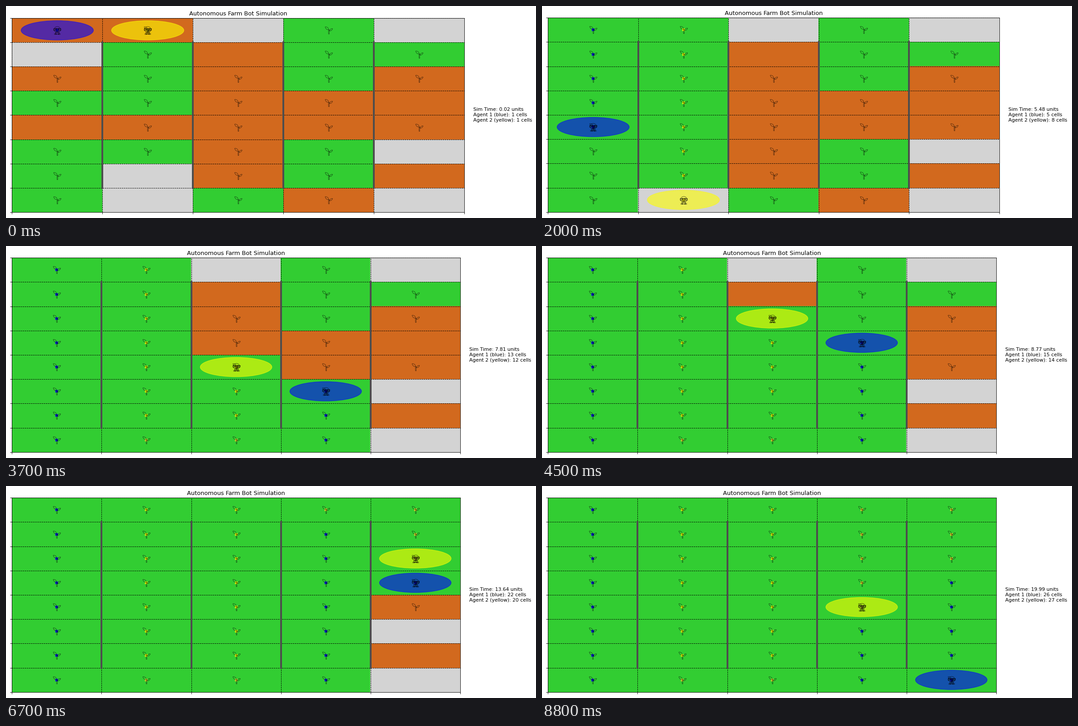
Animation of 1183 by 473 pixels, one loop 8900 ms. Source, as a matplotlib script:

```python
import numpy as np
import matplotlib.pyplot as plt
from matplotlib.animation import FuncAnimation
from matplotlib.colors import ListedColormap
from matplotlib.patches import Circle
from matplotlib.path import Path

W, H, DPI = 1183, 473, 80
FRAMES = 89
COLS, ROWS = 5, 8
FALLOW, TILLED, PLANTED, GROWN = range(4)
NEXT = {FALLOW: GROWN, TILLED: PLANTED, PLANTED: GROWN}
COLORS = {"A": "blue", "B": "yellow"}

# one letter per cell: fallow, tilled, planted, grown
FIELD = ["TPFGF", "FGTGG", "PGPGP", "GGPPT",
         "TPPPP", "GGPGF", "GFPGT", "GFGPF"]


def lane(col, start, stop):
    step = 1 if stop >= start else -1
    return [(col, row) for row in range(start, stop + step, step)]


ROUTES = {
    "A": lane(0, 0, 7) + [(1, 7), (2, 7)] + lane(3, 7, 0) + lane(4, 0, 7),
    "B": lane(1, 0, 7) + lane(2, 7, 0) + [(3, 0)] + lane(4, 0, 2)
         + lane(4, 1, 0) + lane(3, 0, 4),
}


def simulate():
    """Agents take turns: tend the cell underneath, else move on."""
    field = np.array([["FTPG".index(c) for c in row] for row in FIELD])
    pos = {"A": 0, "B": 0}
    tick = 0
    history = [(field.copy(), dict(pos), tick)]
    for n in range(1, FRAMES):
        me, other = ("A", "B") if n % 2 else ("B", "A")
        route, i = ROUTES[me], pos[me]
        (col, row), (c0, r0) = route[i], route[max(i - 1, 0)]
        ahead = (2 * col - c0, 2 * row - r0)
        held = i > 0 and ROUTES[other][pos[other]] == ahead
        if field[row, col] != GROWN:
            field[row, col] = NEXT[field[row, col]]
        elif not held and i + 1 < len(route):
            pos[me] += 1
        if not held:
            tick = n
        history.append((field.copy(), dict(pos), tick))
    return history


HISTORY = simulate()


def clock(tick):
    return np.interp(tick, [0, 20, 29, 45, 57, 77, 88],
                     [0.02, 5.48, 6.85, 8.77, 12.16, 15.13, 19.99])


# glyph parts in pixels around the cell centre, y up
def ring(x, y, rx, ry):
    unit = Path.unit_circle()
    return Path(unit.vertices * (rx, ry) + (x, y), unit.codes)


def box(x, y, rx, ry):
    corners = [(-1, -1), (1, -1), (1, 1), (-1, 1), (-1, -1)]
    return Path(np.array(corners) * (rx, ry) + (x, y))


def leaf(base, tip, bulge):
    base, tip = np.array(base), np.array(tip)
    mid = (base + tip) / 2
    side = bulge * np.array([base[1] - tip[1], tip[0] - base[0]])
    return Path([base, mid + side, tip, mid - side, base],
                [Path.MOVETO] + [Path.CURVE3] * 4)


SPROUT = Path.make_compound_path(
    leaf((0, 1.5), (-8, 8), 0.45), leaf((1.5, -1), (8.5, 4), 0.4),
    box(0.3, -3.5, 0.9, 4.5))
ROBOT = Path.make_compound_path(
    ring(0, 2, 7, 6.5), box(0, 2, 8.3, 2),
    *[ring(s * 2.8, 2.5, r, r) for s in (-1, 1) for r in (0.7, 2)],
    box(0, -2, 2.5, 0.6), box(0, -6, 4, 2.2),
    *[box(s * 4, -8, 2.5, 0.8) for s in (-1, 1)])

plt.rcParams["font.family"] = "DejaVu Sans"
fig = plt.figure(figsize=(W / DPI, H / DPI), dpi=DPI, facecolor="white")
ax = fig.add_axes([0, 0, 1, 1])
ax.set_title("Autonomous Farm Bot Simulation", fontsize=11.7)

cells = ax.imshow(HISTORY[0][0], extent=(0, COLS, ROWS, 0), aspect="auto",
                  interpolation="nearest", vmin=0, vmax=3,
                  cmap=ListedColormap(["lightgray", "chocolate",
                                       "chocolate", "limegreen"]))
ax.set_xticks(range(COLS + 1))
ax.set_yticks(range(ROWS + 1))
ax.tick_params(labelbottom=False, labelleft=False)
ax.grid(color="black", linestyle="--", linewidth=0.8)
for x in range(1, COLS):
    ax.plot([x, x], [1, ROWS - 1], color="#4d4d4d", linewidth=3.6)
ax.set_xlim(0, COLS)
ax.set_ylim(ROWS, 0)


def glyphs(path, weight):
    size = 2 * np.abs(path.vertices).max() * 72 / DPI
    return ax.plot([], [], ls="", marker=path, ms=size, mfc="none",
                   mec="black", mew=weight, zorder=3)[0]


def trail(color):
    return ax.plot([], [], ls="", marker="s", ms=5, mew=0, color=color,
                   alpha=0.8, zorder=2.2)[0]


def body(color):
    return ax.add_patch(Circle((0, 0), 0.4, color=color, alpha=0.6))


trails = {k: trail(c) for k, c in COLORS.items()}
bodies = {k: body(c) for k, c in COLORS.items()}
sprouts, robots = glyphs(SPROUT, 0.45), glyphs(ROBOT, 0.5)
info = ax.text(1.02, 0.5, "", transform=ax.transAxes, fontsize=9.8,
               va="center", linespacing=1.25)


def place(right, top, left=13.45, bottom=459.7):
    ax.set_position([left / W, 1 - bottom / H,
                     (right - left) / W, (bottom - top) / H])


def put(line, spots):
    pts = np.array(spots, float).reshape(-1, 2) + 0.5
    line.set_data(pts[:, 0], pts[:, 1])


def draw(n):
    field, pos, tick = HISTORY[n]
    cells.set_data(field)
    rows, cols = np.where(field >= PLANTED)
    put(sprouts, np.column_stack([cols, rows]))
    here = {k: ROUTES[k][pos[k]] for k in pos}
    put(robots, list(here.values()))
    for k, (col, row) in here.items():
        bodies[k].center = (col + 0.5, row + 0.5)
        put(trails[k], sorted(set(ROUTES[k][:pos[k] + 1])))

    done = {k: p + 1 for k, p in pos.items()}
    info.set_text(f"Sim Time: {clock(tick):.2f} units\n"
                  f"Agent 1 (blue): {done['A']} cells\n"
                  f"Agent 2 (yellow): {done['B']} cells")
    # the field narrows after the first draw and as the text grows
    right = 1020.6 if done["B"] < 10 else 1013.6
    place(*((right, 26.3) if n else (1022.9, 27.3)))
    return []


anim = FuncAnimation(fig, draw, frames=FRAMES, interval=100, repeat=True,
                     repeat_delay=0, blit=False)
plt.show()
```
